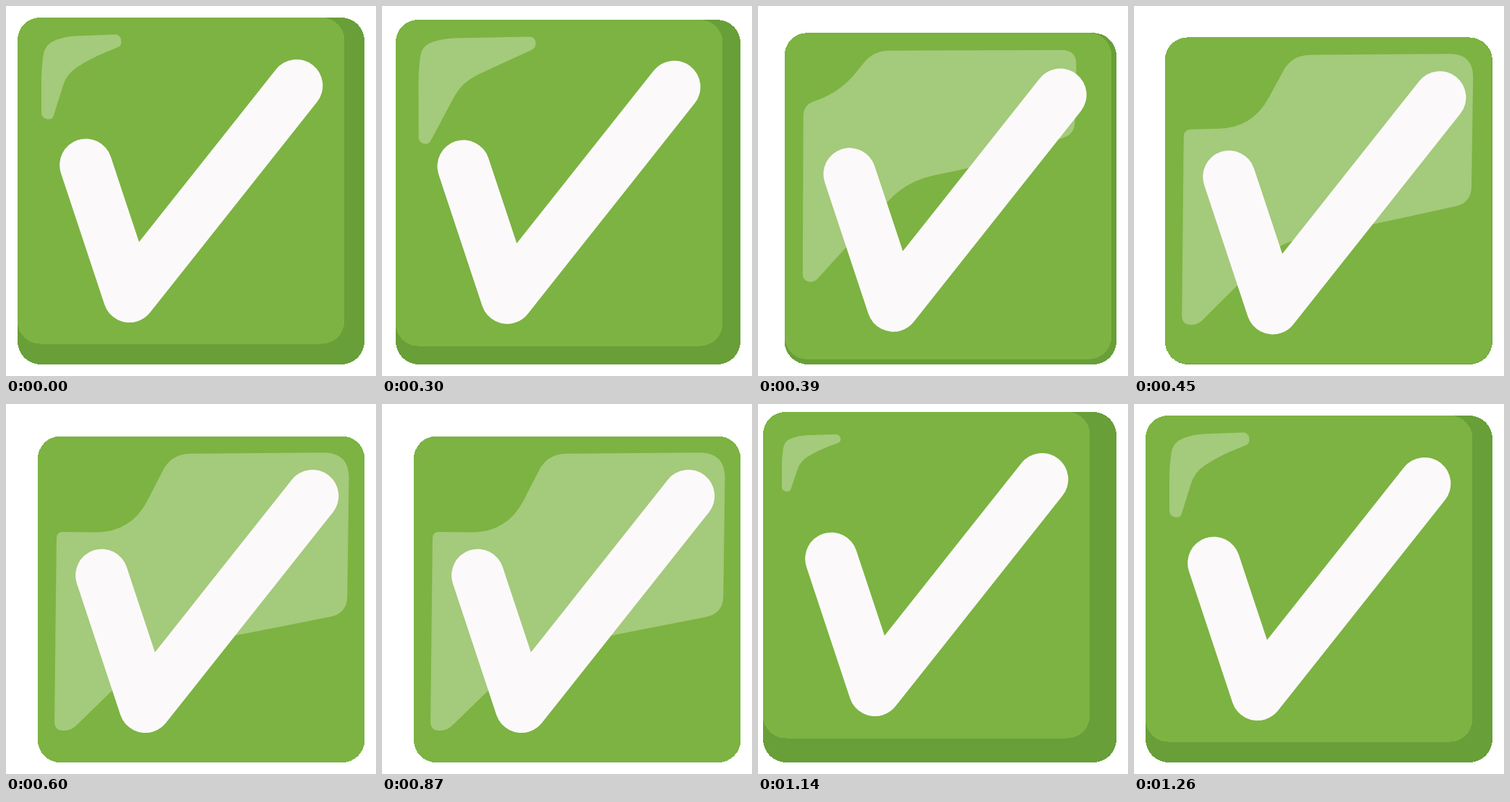
Recreate the animation shown at these times as an HTML page. Size 512 px wide and 512 px high, loop 1.5 s.

```html
<!DOCTYPE html>
<html lang="en">
<head>
<meta charset="utf-8">
<title>Check button</title>
<style>
  html, body { margin: 0; width: 100%; height: 100%; overflow: hidden; background: #fff; }
  svg { display: block; width: 100%; height: 100%; }
  rect { shape-rendering: crispEdges; }
</style>
</head>
<body>
<svg viewBox="0 0 512 512">
  <rect id="side" rx="32" fill="#689f38"/>
  <rect id="face" rx="31" width="452.3" height="451.5" fill="#7cb342"/>
  <path id="shine" fill="#fff" fill-opacity=".3"/>
  <path id="check" d="M110.5 220L170.8 401.8L402 110.2" fill="none" stroke="#fcf9fb"
    stroke-width="72.6" stroke-linecap="round" stroke-linejoin="round"/>
</svg>
<script>
const LOOP = 1500, STEP = 30;
const PRESS = 300, RELEASE = 1020, SETTLE = 240;
const [side, face, shine, check] =
  ['side', 'face', 'shine', 'check'].map(id => document.getElementById(id));

// Shine outlines: corners as [x, y, rounding], clockwise from the lower left.
const rest = [[49, 155, 8], [49, 85, 15], [54, 53, 14], [82, 42, 14], [159, 39, 10],
  [160, 55, 6], [118, 72, 22], [84, 94, 17], [64, 158, 7]];
const half = [[57, 312, 5], [56, 100, 20], [59, 62, 18], [95, 55, 17], [409, 55, 7],
  [406, 70, 8], [300, 126, 45], [208, 148, 45], [66, 317, 5]];
const down = [[67, 451, 11], [70, 177, 9], [173, 178, 50], [229, 69, 26], [475, 67, 36],
  [472, 290, 24], [340, 316, 45], [202, 343, 30], [89, 453, 11]];
const small = rest.map(([x, y, r]) => [33 + (x - 49) * .736, 43 + (y - 41) * .675, r * .7]);

const mix = (a, b, k) => Array.isArray(a) ? a.map((v, i) => mix(v, b[i], k)) : a + (b - a) * k;
const sigmoid = x => 1 / (1 + Math.exp(-x));

// Point on the way from one corner to the next, as far out as its rounding.
function toward([x, y, r], [x2, y2]) {
  const k = r / Math.hypot(x2 - x, y2 - y);
  return [x + (x2 - x) * k, y + (y2 - y) * k];
}

function outline(pts) {
  const n = pts.length;
  return pts.map((p, i) => {
    const from = toward(p, pts[(i + n - 1) % n]), to = toward(p, pts[(i + 1) % n]);
    return `${i ? 'L' : 'M'}${from}Q${p[0]},${p[1]} ${to}`;
  }).join('') + 'Z';
}

function place(x, y, dx, dy, pts) {
  for (const el of [side, face]) {
    el.setAttribute('x', x);
    el.setAttribute('y', y);
  }
  side.setAttribute('width', 496 - x);
  side.setAttribute('height', 496 - y);
  check.setAttribute('transform', `translate(${dx} ${dy})`);
  shine.setAttribute('d', outline(pts));
}

function drawPress(t) {
  const p = t < PRESS ? 0 : sigmoid((t - PRESS - 60) / 28.3);
  const pts = p < .5 ? mix(rest, half, p * 2) : mix(half, down, p * 2 - 1);
  place(16 + 28 * p, 16 + 28.6 * p, 22 * p, 17 * p, pts);
}

function drawRelease(t) {
  const k = Math.min(1, t / SETTLE);
  const lift = (1 - Math.cos(2 * Math.PI * k)) / 2;
  place(mix(18, 16, k) - 10 * lift, mix(22, 16, k) - 8 * lift,
    -9 * lift, -6 * lift, mix(rest, small, lift));
}

function draw(now) {
  const t = Math.floor(now % LOOP / STEP) * STEP;
  if (t < RELEASE) drawPress(t);
  else drawRelease(t - RELEASE);
}

const start = performance.now();
function tick() {
  draw(performance.now() - start);
  requestAnimationFrame(tick);
}
tick();
</script>
</body>
</html>
```
